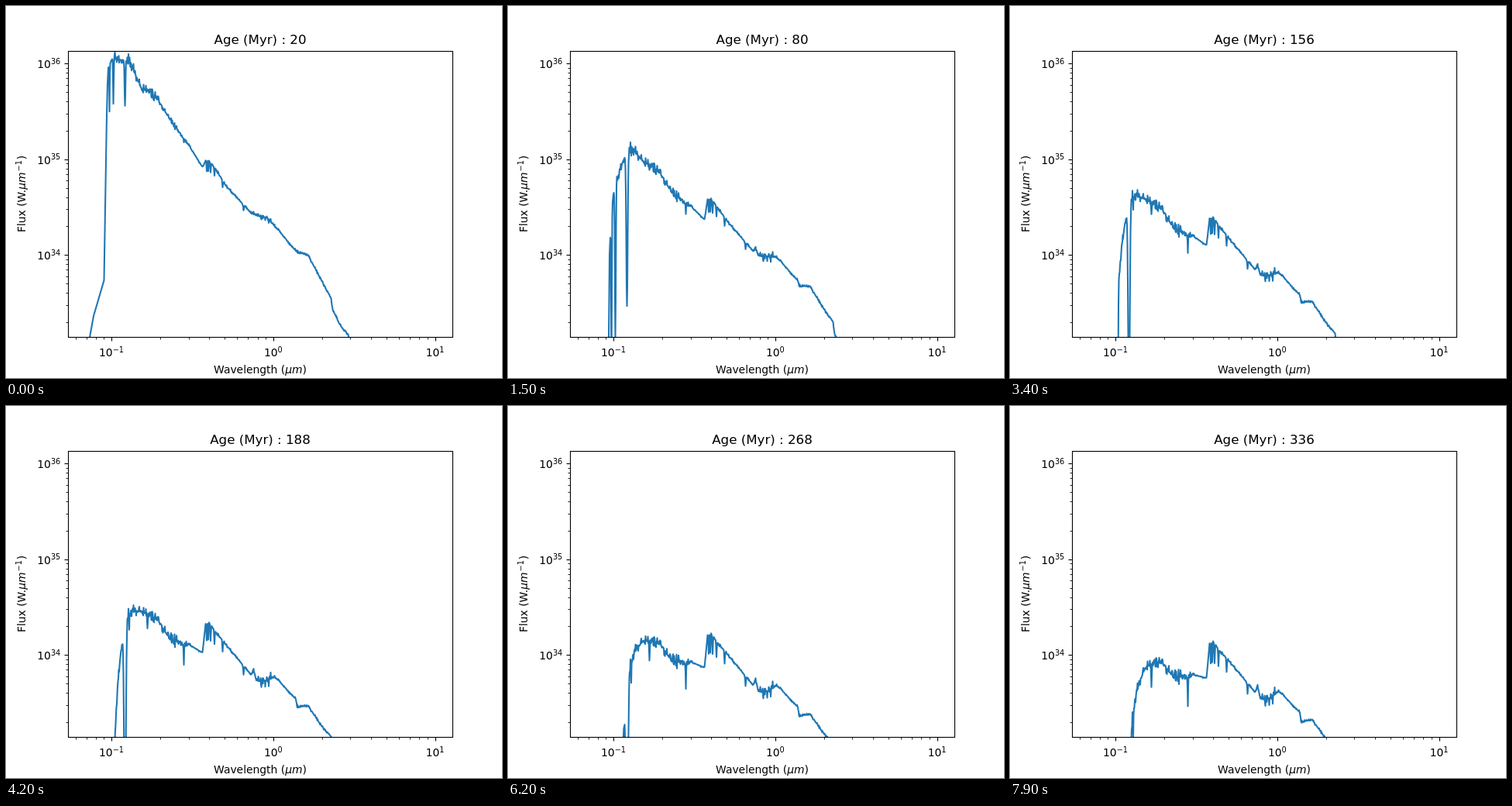
These frames come from a looping animation (640x480 px, 8 s). An HTML page:

```html
<!DOCTYPE html>
<html lang="en">
<head>
<meta charset="utf-8">
<title>Spectrum by age</title>
<style>
  html, body { margin: 0; width: 100%; height: 100%; overflow: hidden; background: #fff; }
  svg { display: block; width: 640px; height: 480px; }
  text { font: 13.89px "DejaVu Sans", sans-serif; text-anchor: middle; }
  .sup { font-size: 9.72px; }
  .it { font-style: italic; }
</style>
</head>
<body>
<svg viewBox="0 0 640 480">
  <clipPath id="box"><rect x="80" y="57.6" width="496" height="369.6"/></clipPath>
  <path id="curve" clip-path="url(#box)" fill="none" stroke="#1f77b4" stroke-width="2.08" stroke-linejoin="round"/>
  <rect x="80.5" y="58.5" width="496" height="369" fill="none" stroke="#000" stroke-width="1.1"/>
  <g id="axes"></g>
  <text id="title" x="328" y="49" style="font-size:16.67px"></text>
  <text x="328" y="474">Wavelength (<tspan class="it">μm</tspan>)</text>
  <text transform="translate(25 242.4) rotate(-90)">Flux (W.<tspan class="it">μm</tspan><tspan class="sup" dx="1" dy="-5.3">−1</tspan><tspan dx="1" dy="5.3">)</tspan></text>
</svg>
<script>
const $ = id => document.getElementById(id);

// Axes: log ticks and power-of-ten labels
const X = v => 344.8 + 208.8 * Math.log10(v);
const Y = v => 74.2 + 123.5 * (36 - Math.log10(v));
const snap = v => Math.round(v) + .5;
let marks = "";
const tick = (d, major) => marks += `<path d="${d}" stroke="#000" stroke-width="${major ? 1.1 : .83}"/>`;
const power = (x, y, e, anchor) => marks +=
  `<text x="${x}" y="${y}" style="text-anchor:${anchor}">10<tspan class="sup" dy="-5.3">${String(e).replace("-", "−")}</tspan></text>`;

function axis(from, to, place) {
  for (let e = from; e <= to; e++)
    for (let m = 1; m < 10; m++) place(m * 10 ** e, m == 1, e);
}
axis(-2, 1, (v, major, e) => {
  const x = X(v);
  if (x < 80 || x > 576) return;
  tick(`M${snap(x)} 427.5v${major ? 5 : 3}`, major);
  if (major) power(x, 452, e, "middle");
});
axis(33, 36, (v, major, e) => {
  const y = Y(v);
  if (y < 58 || y > 427) return;
  tick(`M80.5 ${snap(y)}h${major ? -5 : -3}`, major);
  if (major) power(70.3, y + 6, e, "end");
});
$("axes").innerHTML = marks;

// Continuum corners: x, height when young, fall over the whole run
const corners = [
  [107, 433, 600], [113, 400, 600], [126.5, 354, 600], [128.5, 230, 650], [130, 140, 450],
  [131, 100, 340], [132, 80, 375], [136, 70, 338], [140, 64, 325], [145, 68, 285],
  [149, 70, 260], [158, 70, 230], [165, 83, 215], [175, 108, 191], [183, 106, 196],
  [200, 127, 191], [211, 146, 193], [235, 178, 161], [253.5, 208, 138], [257.5, 200, 102],
  [262, 200, 99], [270, 209, 102], [283, 231, 95], [316, 267, 100], [319.5, 267, 92],
  [323, 270, 105], [336, 273, 102], [347, 284, 82], [374, 316, 78], [375.5, 317, 89],
  [390, 322, 82], [408, 356, 73], [419.5, 377, 62], [421, 390, 65], [430, 410, 62], [445, 430, 60]
];
// Extra fall at high age, strongest towards the Lyman edge
const late = x => 80000 / ((x - 130) ** 2 + 4);

// Absorption lines; s runs from 0 (young) to 1 (old)
const lines = [];
const line = (wave, depth, width = () => .55) =>
  lines.push({ c: Math.round(2 * X(wave)) / 2, depth, width });
const series = (limit, low, n) => limit * n * n / (n * n - low * low);
for (let n = 2; n < 5; n++)
  line(series(.09113, 1, n), s => 60 + 280 * s, s => (.8 + .9 * s) * 2 / n);
for (let n = 3; n < 9; n++)
  line(series(.36457, 2, n), s => Math.min(n, 6) * (2.2 + 2.2 * s * s));
for (const metal of [.129, .167, .28]) line(metal, s => 2 + 30 * s * s);

// Fine structure: crowded ultraviolet lines and the Paschen region are rougher
function roughness(x, s) {
  if (x < 139) return 0;
  if (x < 200) return 8;
  if (x < 235) return 4 + 6 * s;
  if (x > 324 && x < 342) return 4 + 6 * s;
  return 1.8;
}
let seed = 7;
const grain = Array.from({ length: 900 }, () =>
  ((seed = seed * 16807 % 2147483647) / 1073741824 - 1) ** 3);

const mix = (a, b, f) => a + (b - a) * f;

// Flux falls as a power of age, so heights follow log age
function spectrum(age) {
  const s = Math.log(age / 20) / Math.log(336 / 20);
  let d = "", k = 0;
  for (let x = 107; x <= 445; x += .5) {
    if (x > corners[k + 1][0]) k++;
    const [x0, y0, fall0] = corners[k], [x1, y1, fall1] = corners[k + 1];
    const f = (x - x0) / (x1 - x0);
    let y = mix(y0, y1, f) + s * mix(fall0, fall1, f) + s ** 8 * late(x);
    y += grain[2 * x] * roughness(x, s);
    for (const { c, depth, width } of lines)
      y += depth(s) * Math.exp(-(((x - c) / width(s)) ** 2));
    d += (d ? "L" : "M") + x + " " + y.toFixed(2);
  }
  return d;
}

let shown = -1;
function draw() {
  const step = Math.floor(performance.now() % 8000 / 100);
  if (step != shown) {
    shown = step;
    const age = 20 + 4 * step;
    $("title").textContent = "Age (Myr) : " + age;
    $("curve").setAttribute("d", spectrum(age));
  }
  requestAnimationFrame(draw);
}
draw();
</script>
</body>
</html>
```
